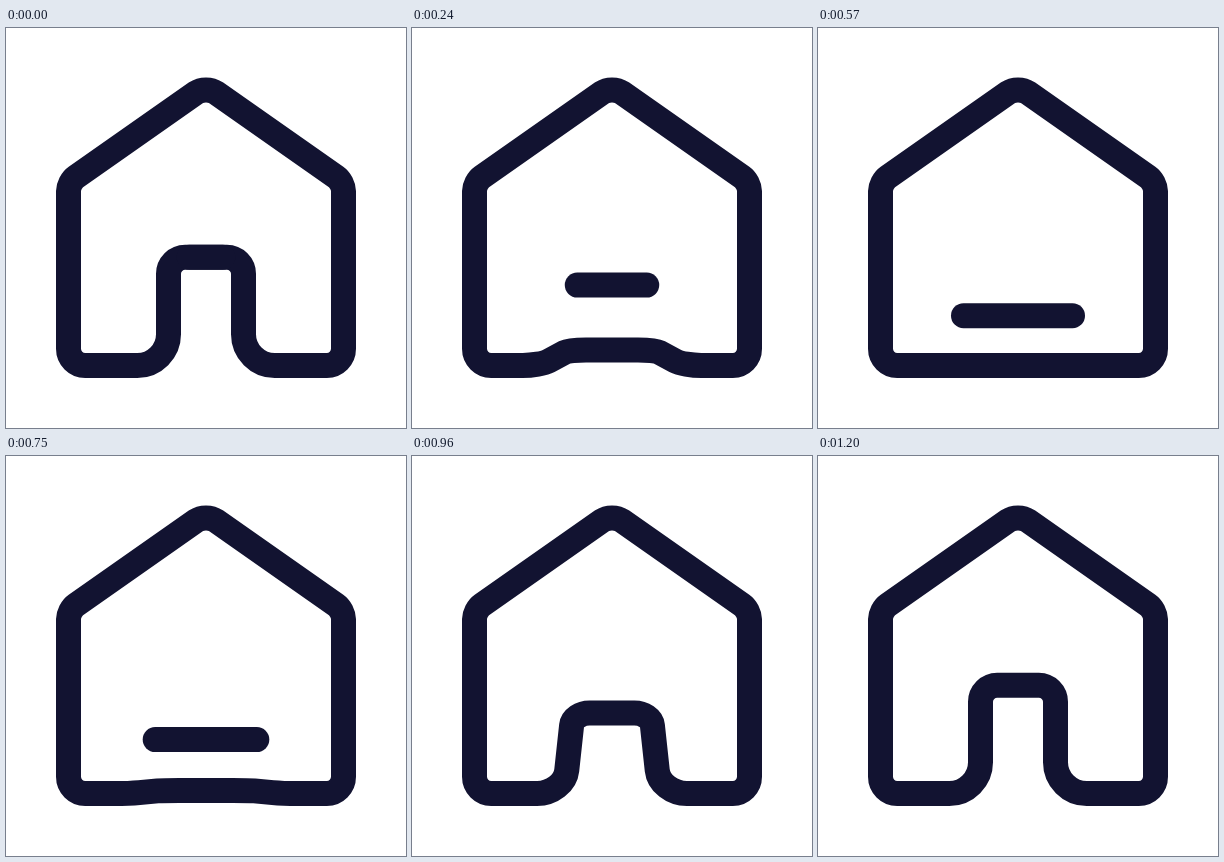
An HTML page for the animation above (3.73 s loop, 400 by 400 pixels).

```html
<!DOCTYPE html>
<html lang="en">
<head>
<meta charset="utf-8">
<title>Home icon</title>
<style>
  html, body { margin: 0; width: 100%; height: 100%; overflow: hidden; background: #fff; }
  svg { display: block; width: 100%; height: 100%; }
</style>
</head>
<body>
<svg viewBox="0 0 400 400" fill="none" stroke="#121331" stroke-width="25" stroke-linecap="round" stroke-linejoin="round">
  <path id="house"/>
  <path id="bar"/>
</svg>
<script>
const LOOP = 3730, STEP = 30;
const MID = 200, WALL = 62.5, FLOOR = 337.5, LINTEL = 229.17, JAMB = 162.5;
const ROUND = 16.67, FOOT = 31.25;
const house = document.getElementById('house');
const bar = document.getElementById('bar');

const mix = (a, b, p) => a + (b - a) * p;

// Cubic bezier easing with handles at (x1, 0) and (x2, 1)
function ease(x, x1, x2) {
  if (x <= 0) return 0;
  if (x >= 1) return 1;
  let lo = 0, hi = 1;
  for (let i = 0; i < 24; i++) {
    const s = (lo + hi) / 2, r = 1 - s;
    if (3 * r * r * s * x1 + 3 * r * s * s * x2 + s * s * s < x) lo = s; else hi = s;
  }
  return lo * lo * (3 - 2 * lo);
}

const tween = (t, start, length, x1, x2) => ease((t - start) / length, x1, x2);

// Point at a distance from a on the way to b
function toward(a, b, distance) {
  const f = distance / Math.hypot(b.x - a.x, b.y - a.y);
  return { x: mix(a.x, b.x, f), y: mix(a.y, b.y, f) };
}

// Closed path whose corners are rounded over the lengths "before" and "after"
function roundedPath(corners) {
  const n = corners.length;
  const xy = p => `${p.x.toFixed(2)} ${p.y.toFixed(2)} `;
  const parts = corners.map((c, i) => {
    const prev = corners[(i + n - 1) % n], next = corners[(i + 1) % n];
    const at = (to, d) => xy(toward(c, to, d));
    return 'L' + at(prev, c.before) + 'C' + at(prev, c.before * 0.45) +
      at(next, c.after * 0.45) + at(next, c.after);
  });
  return 'M' + parts.join('').slice(1) + 'Z';
}

const corner = (x, y, before, after = before) => ({ x, y, before, after });
const mirror = c => corner(2 * MID - c.x, c.y, c.after, c.before);

// shut: 0 is an open doorway, 1 a flat floor
function outline(shut) {
  const footX = JAMB - 40 * shut, topX = JAMB - 6 * shut;
  const topY = mix(LINTEL, FLOOR, shut);
  const leg = Math.hypot(topX - footX, FLOOR - topY) / (FLOOR - LINTEL);
  const left = [
    corner(WALL, 154.1, 9),
    corner(WALL, FLOOR, ROUND),
    corner(footX, FLOOR, FOOT - 16 * shut, FOOT * leg),
    corner(topX, topY, ROUND * leg, ROUND)
  ];
  return roundedPath([corner(MID, 57.8, 12.3), ...left, ...left.map(mirror).reverse()]);
}

function draw(t) {
  const shut = tween(t, 0, 400, 0.33, 0.28);
  const open = tween(t, 690, 500, 0.45, 0.32);
  const drop = tween(t, 100, 400, 0.33, 0.3);
  const lift = tween(t, 690, 510, 0.17, 0.83);

  house.setAttribute('d', outline(shut - open));

  const y = mix(LINTEL, 287.7, drop - lift);
  const half = (mix(33.5, 109, drop) - 104 * lift) / 2;
  bar.setAttribute('d', `M${MID - half} ${y} H${MID + half}`);
  // The bar merges into the lintel as it rises past
  bar.style.display = t >= 960 ? 'none' : '';
}

function tick() {
  const t = performance.now() % LOOP;
  draw(Math.floor(t / STEP) * STEP);
  requestAnimationFrame(tick);
}

draw(0);
requestAnimationFrame(tick);
</script>
</body>
</html>
```
